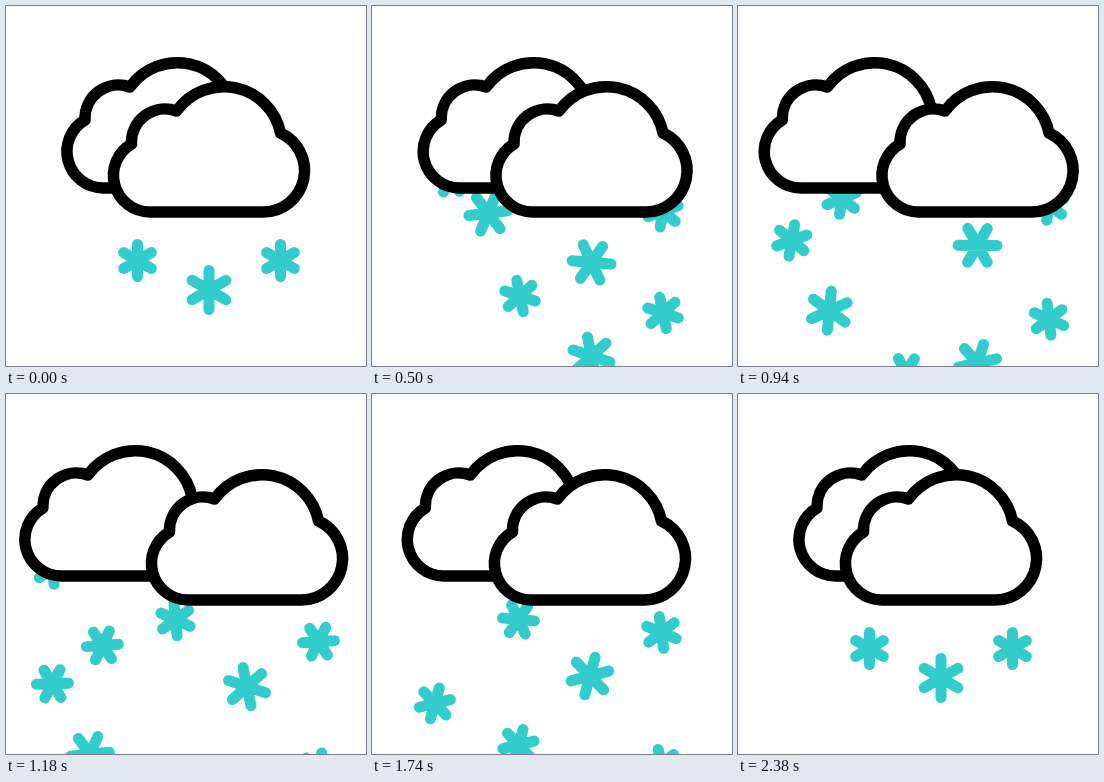
These frames come from a looping animation (360 px wide and 360 px high, 2620 ms). An HTML page:

```html
<!DOCTYPE html>
<html lang="en">
<head>
<meta charset="utf-8">
<title>Snow clouds</title>
<style>
html, body { margin: 0; width: 100%; height: 100%; overflow: hidden; background: #fff; }
svg { display: block; width: 100%; height: 100%; }
.cloud { fill: #fff; stroke: #000; stroke-width: 11.5; stroke-linejoin: round; }
.flake { fill: none; stroke: #33cccc; stroke-width: 11; stroke-linecap: round; }
</style>
</head>
<body>
<svg viewBox="0 0 360 360">
  <defs>
    <path id="shape" d="M125.5 138A33.5 33.5 0 0 1 170.5 105A58 58 0 0 1 274.5 127A41.4 41.4 0 0 1 257.5 206H144A36.5 36.5 0 0 1 125.5 138Z"/>
  </defs>
  <g id="snow"></g>
  <use id="back" class="cloud" href="#shape"/>
  <use id="front" class="cloud" href="#shape"/>
</svg>
<script>
const LOOP = 2620, MOVE_END = 2380, STEP = 20, SPIN = -0.175, SPIN_START = 90;
const SMALL = 16, BIG = 19.5;
const byId = id => document.getElementById(id);
const snow = byId('snow'), back = byId('back'), front = byId('front');

const ease = u => (1 - Math.cos(Math.PI * Math.min(1, Math.max(0, u)))) / 2;
const swing = (t, start, peak, end) =>
  t < peak ? ease((t - start) / (peak - start)) : ease((end - t) / (end - peak));
const frontX = t => 38.5 * swing(t, 0, 1100, 2220);
const backX = t => -42.5 * swing(t, 150, 1250, MOVE_END);

// Gentle start that tends to a constant speed
const fall = (d, v) => d > 0 ? v * d * d / (d + 100) : 0;

const leave = (t0, y, v) => t =>
  [y + fall(t - t0, v), SPIN * Math.max(0, t - SPIN_START)];
const drop = (t0, y, v, turn) => t => {
  const d = t - t0;
  return [Math.max(160, y + (d < 0 ? 0.06 * d : fall(d, v))), turn + SPIN * d];
};
const settle = (end, y, k) => t => {
  const d = Math.max(0, end - t);
  return [Math.max(170, y - k * d * d), -SPIN * d];
};

function arms(r) {
  const x = r * Math.cos(Math.PI / 6), y = r / 2;
  return `M0 ${-r}V${r}M${-x} ${-y}L${x} ${y}M${-x} ${y}L${x} ${-y}`;
}

function flake(x, r, sway, path) {
  const el = document.createElementNS('http://www.w3.org/2000/svg', 'path');
  el.setAttribute('class', 'flake');
  el.setAttribute('d', arms(r));
  snow.append(el);
  return t => {
    const [y, turn] = path(t);
    el.setAttribute('transform', `translate(${x + sway(t)} ${y}) rotate(${turn})`);
  };
}

const flakes = [
  // left column of the front cloud
  [131.5, SMALL, frontX, leave(230, 254.5, 0.18)],
  [131.5, SMALL, frontX, drop(908, 180, 0.23, 102)],
  [131.5, SMALL, frontX, settle(1940, 254.5, 7.25e-4)],
  // middle column
  [203, BIG, frontX, leave(120, 284, 0.22)],
  [203, BIG, frontX, drop(65, 174, 0.233, 51)],
  [203, BIG, frontX, drop(605, 180, 0.23, 29)],
  [203, BIG, frontX, settle(1828, 284, 2.58e-4)],
  // right column
  [274.5, SMALL, frontX, leave(170, 254.5, 0.207)],
  [274.5, SMALL, frontX, drop(342, 180, 0.26, 98)],
  [274.5, SMALL, frontX, drop(800, 180, 0.225, 93)],
  [274.5, SMALL, frontX, settle(2040, 254.5, 1.78e-4)],
  // back cloud
  [126, BIG, backX, drop(345, 185, 0.235, 50)],
  [88.5, SMALL, backX, drop(638, 180, 0.24, 63)],
  [138.5, SMALL, backX, drop(807, 172, 0.27, 31)],
  [88.5, SMALL, backX, drop(1192, 175, 0.29, 52)]
].map(f => flake(...f));

function render(ms) {
  const t = Math.min(MOVE_END, Math.floor(ms % LOOP / STEP) * STEP);
  front.setAttribute('transform', `translate(${frontX(t)} 0)`);
  back.setAttribute('transform', `translate(${backX(t) - 46.5} -24)`);
  flakes.forEach(place => place(t));
}

const begin = performance.now();
function tick() {
  render(performance.now() - begin);
  requestAnimationFrame(tick);
}
tick();
</script>
</body>
</html>
```
